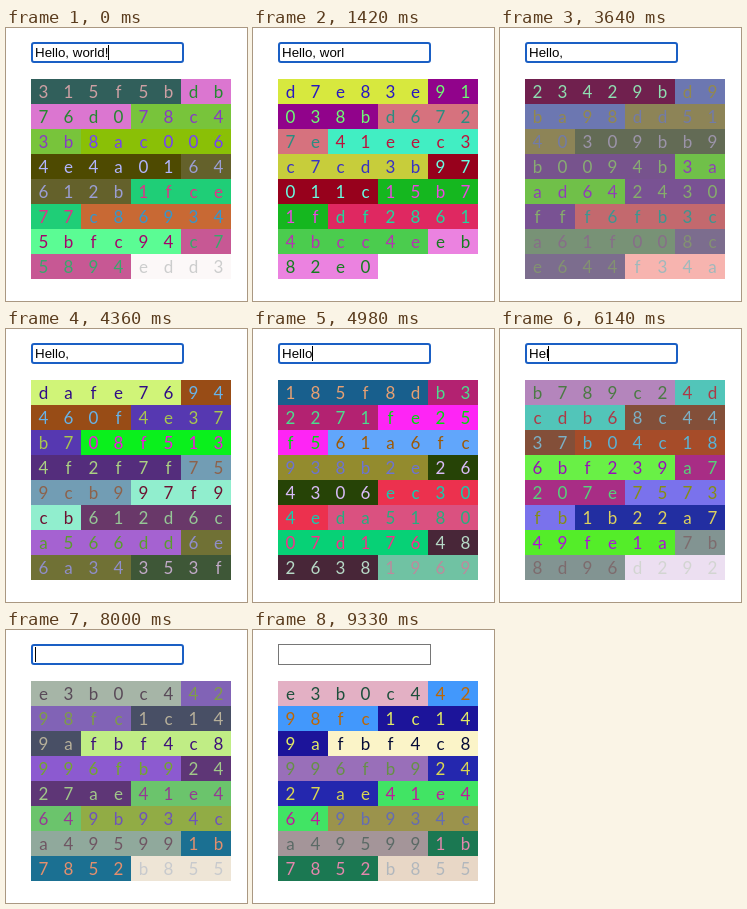
These frames come from a looping animation (241 px wide and 273 px high, 9350 ms). An HTML page:

```html
<!DOCTYPE html>
<html lang="en">
<head>
<meta charset="utf-8">
<title>Hash colours</title>
<style>
  html, body { margin: 0; width: 100%; height: 100%; overflow: hidden; background: #fff; }
  #field {
    position: absolute; left: 25px; top: 14px; width: 153px; height: 21px;
    box-sizing: border-box; border: 1px solid #767676; padding-left: 3px;
    font: 13.333px/19px "Liberation Sans", Arial, sans-serif; color: #000; white-space: pre;
  }
  #field.focus { border: 2px solid #1a5fc4; border-radius: 3px; padding-left: 2px; line-height: 17px; }
  #caret { position: absolute; top: 17px; width: 1px; height: 15px; background: #000; }
  #grid {
    position: absolute; left: 25px; top: 51px; width: 200px;
    display: grid; grid-template-columns: repeat(8, 25px); grid-auto-rows: 25px;
    font: 17px/25px Lato, sans-serif; text-align: center;
  }
</style>
</head>
<body>
<div id="field"></div>
<div id="caret"></div>
<div id="grid"></div>
<script>
const LOOP = 9350, TICK = 9330 / 105;   // the screen refreshes once per tick
const MESSAGE = 'Hello, world!';
const keyTicks = [8, 14, 20, 27, 33, 41, 47, 53, 61, 68, 74, 81, 89];
const hashTicks = [8.4, 13.5, 20.4, 26.5, 33.4, 40.45, 47.4, 53.9, 61, 67.5, 74.4, 81.3, 89.2];
const FADE = 200 / TICK, BLINK = 5.55, BLINK_START = 2.6, BLUR = 105;

function sha256(text) {
  const primes = [];
  for (let n = 2; primes.length < 64; n++) if (primes.every(p => n % p)) primes.push(n);
  const fraction = x => (x % 1) * 2 ** 32 | 0;
  const K = primes.map(p => fraction(Math.cbrt(p)));
  const hash = primes.slice(0, 8).map(p => fraction(Math.sqrt(p)));
  const rotr = (x, n) => x >>> n | x << 32 - n;

  const w = Array(64).fill(0);            // one block is enough for short text
  [...text + '\x80'].forEach((c, i) => w[i >> 2] |= c.charCodeAt(0) << 24 - i % 4 * 8);
  w[15] = text.length * 8;

  let [a, b, c, d, e, f, g, h] = hash;
  for (let i = 0; i < 64; i++) {
    if (i > 15) {
      const x = w[i - 15], y = w[i - 2];
      w[i] = w[i - 16] + (rotr(x, 7) ^ rotr(x, 18) ^ x >>> 3) +
             w[i - 7] + (rotr(y, 17) ^ rotr(y, 19) ^ y >>> 10) | 0;
    }
    const t1 = h + (rotr(e, 6) ^ rotr(e, 11) ^ rotr(e, 25)) + (e & f ^ ~e & g) + K[i] + w[i] | 0;
    const t2 = (rotr(a, 2) ^ rotr(a, 13) ^ rotr(a, 22)) + (a & b ^ a & c ^ b & c) | 0;
    [a, b, c, d, e, f, g, h] = [t1 + t2 | 0, a, b, c, d + t1 | 0, e, f, g];
  }
  return [a, b, c, d, e, f, g, h]
    .map((v, i) => (v + hash[i] >>> 0).toString(16).padStart(8, '0')).join('');
}

// Six digits make #rrggbb; the four left over make #rgba.
function parseColor(hex) {
  const full = hex.length === 4 ? hex.replace(/./g, '$&$&') : hex + 'ff';
  const [r, g, b, a] = full.match(/../g).map(v => parseInt(v, 16));
  return [r, g, b, a / 255];
}

function mix(from, to, p) {
  const a = from[3] + (to[3] - from[3]) * p;
  const rgb = [0, 1, 2].map(i =>
    a ? (from[i] * from[3] * (1 - p) + to[i] * to[3] * p) / a : 0);
  return [...rgb, a];
}

const css = ([r, g, b, a]) => `rgba(${r}, ${g}, ${b}, ${a})`;
const invert = ([r, g, b, a]) => [255 - r, 255 - g, 255 - b, a];

// cubic-bezier(.25, .1, .25, 1)
function ease(x) {
  const bezier = (u, p1, p2) => 3 * u * (1 - u) ** 2 * p1 + 3 * u * u * (1 - u) * p2 + u ** 3;
  let lo = 0, hi = 1;
  for (let i = 0; i < 20; i++) {
    const mid = (lo + hi) / 2;
    if (bezier(mid, .25, .25) < x) lo = mid; else hi = mid;
  }
  return bezier(lo, .1, 1);
}

const states = [...MESSAGE, ''].map((_, i) => {
  const digits = sha256(MESSAGE.slice(0, MESSAGE.length - i));
  return { digits, colors: digits.match(/.{1,6}/g).map(parseColor) };
});

const field = document.getElementById('field');
const caret = document.getElementById('caret');
const grid = document.getElementById('grid');
const cells = Array.from({ length: 64 }, () => grid.appendChild(document.createElement('div')));
const pen = document.createElement('canvas').getContext('2d');
pen.font = '13.333px "Liberation Sans", Arial, sans-serif';

function draw(now) {
  const tick = Math.floor((now % LOOP + 9) / TICK);
  const passed = list => list.filter(t => t <= tick).length;

  const text = MESSAGE.slice(0, MESSAGE.length - passed(keyTicks));
  const focused = tick < BLUR;
  const blinks = Math.floor((tick - BLINK_START) / BLINK);
  field.textContent = text;
  field.className = focused ? 'focus' : '';
  caret.style.left = Math.floor(29 + pen.measureText(text).width) + 'px';
  caret.hidden = !focused || blinks % 2 === 0;

  const step = passed(hashTicks);
  const { digits, colors } = states[step];
  const p = step ? ease(Math.min(1, (tick - hashTicks[step - 1]) / FADE)) : 1;
  const shown = colors.map((c, i) => p < 1 ? mix(states[step - 1].colors[i], c, p) : c);
  cells.forEach((cell, i) => {
    const color = shown[Math.floor(i / 6)];
    cell.textContent = digits[i];
    cell.style.background = css(color);
    cell.style.color = css(invert(color));
  });
  requestAnimationFrame(draw);
}
requestAnimationFrame(draw);
</script>
</body>
</html>
```
